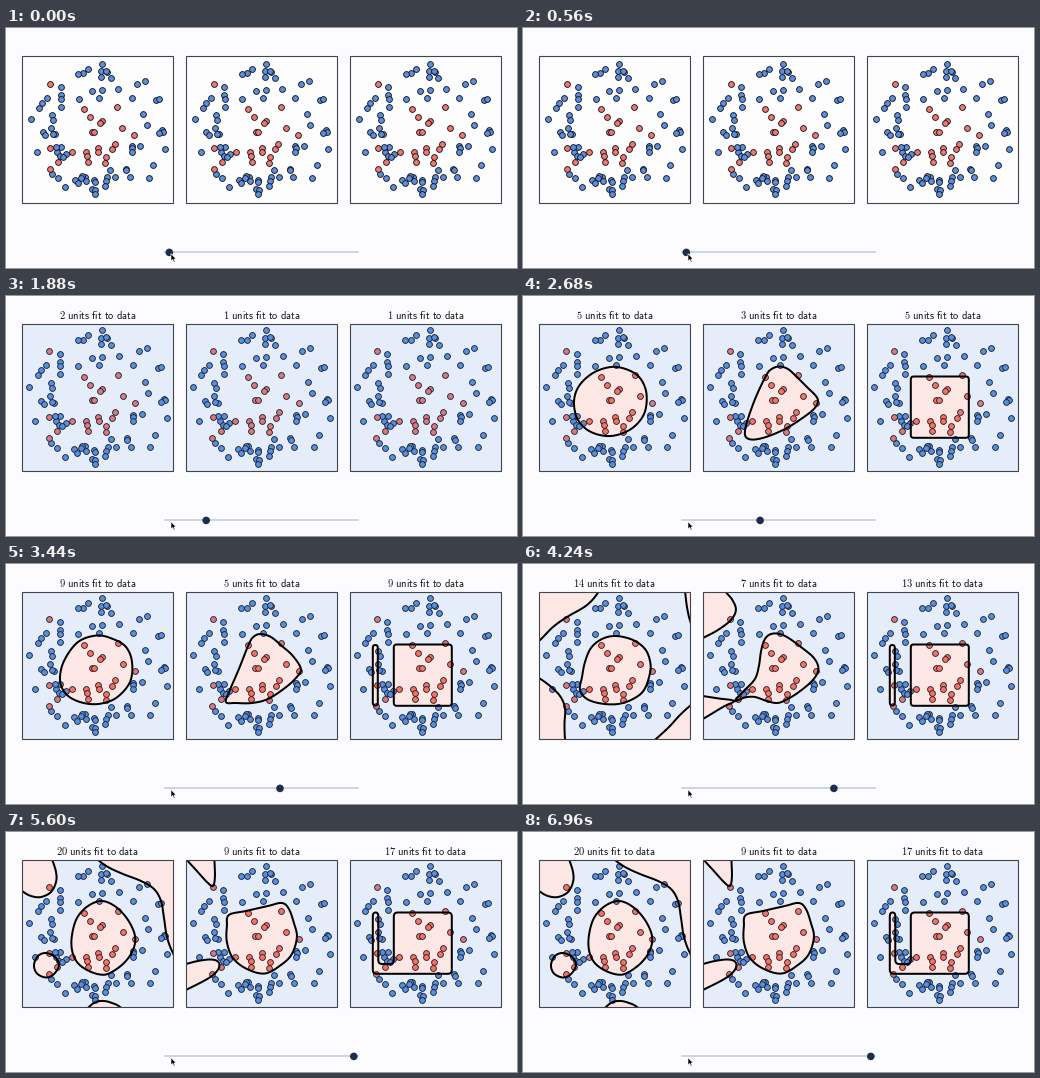
A matplotlib script that plays this animation: 511x240 px, repeating every 7 s.

```python
import numpy as np
import matplotlib.pyplot as plt
from matplotlib.animation import FuncAnimation
from matplotlib.patches import Circle, PathPatch, Polygon, Rectangle
from matplotlib.path import Path

W, H, DPI = 511, 240, 100
FRAMES, STEP_MS = 175, 40
SWITCH_MS = [840, 1940, 3040, 4140, 5240]
PX = 72 / DPI

BG, EDGE, NAVY, TRACK = "#fcfcfe", "#40444c", "#1f2d4d", "#cdd5e1"
BLUE, RED = "#5c8fe0", "#f4766e"
BLUE_TINT, RED_TINT, TINT = "#4a88e6", "#ff5a48", 0.13

# Panel geometry; shapes and dots use the first panel's coordinates.
X0, Y0, X1, Y1, PITCH = 16, 27.6, 167.3, 174.8, 163.9
CENTER = np.array([(X0 + X1) / 2, (Y0 + Y1) / 2])

BLUE_TOP = [
    (96, 34), (82, 39), (77, 43.5), (71.5, 44), (95, 41.5), (101, 42), (100, 41),
    (95, 47.5), (105, 49), (132.5, 55), (140.5, 52), (53.5, 58), (53.5, 66),
    (54, 70), (39.5, 69), (34.5, 74), (31.5, 79), (96, 61), (86, 62), (113, 59.5),
    (126.5, 69), (151.5, 71.5), (154.5, 70.5), (72, 70), (93, 69), (54, 78),
    (23, 91), (44.5, 86.5), (46, 92), (138.5, 86), (142, 96.5), (44, 100),
]
BLUE_LOW = [
    (35, 104.5), (37.5, 107.5), (48, 106.5), (45.5, 106), (29, 124.5),
    (157.5, 102.5), (158.5, 104), (155, 105.5), (160.5, 122), (126.5, 118.5),
    (127, 121), (126.5, 125), (135.5, 118), (149, 138.5), (144, 151),
    (120.5, 142), (121, 143.5), (124.5, 150.5), (104.5, 143), (101.5, 150.5),
    (109.5, 150.5), (100, 155), (99, 159.5), (88, 153.5), (88.5, 155.5),
    (86, 163), (89, 164), (88.5, 168), (78.5, 150), (76, 149.5), (68, 153),
    (75, 151.5), (80, 154.5), (71, 156.5), (58.5, 160.5), (51, 151.5),
    (45, 147), (59.5, 126.5), (54, 119.5), (50, 124.5), (53, 129),
    (56, 129.5), (48.5, 120),
]
REDS = [
    (43, 55), (111.5, 78.5), (78, 80.5), (84, 89), (96, 93), (94, 94.5),
    (116.5, 99.5), (129, 107), (85.5, 104), (88, 104), (109, 116),
    (106, 121.5), (92, 121), (92.5, 125), (79.5, 124.5), (65.5, 125),
    (81, 129), (100, 130), (99.5, 136), (81.5, 134.5), (43, 120.5),
    (51, 134.5), (42.5, 142),
]


def wind(pts):
    """Points in a fixed turning direction."""
    x, y = np.asarray(pts, float).T
    area = np.sum(x * np.roll(y, -1) - y * np.roll(x, -1))
    return np.column_stack([x, y])[:: 1 if area > 0 else -1]


def closed_path(pts):
    return Path(np.vstack([pts, pts[:1]]), closed=True)


def blob(*pts):
    """Closed Catmull-Rom curve."""
    p = wind(pts)
    a, c, d = np.roll(p, 1, 0), np.roll(p, -1, 0), np.roll(p, -2, 0)
    t = np.linspace(0, 1, 12, endpoint=False)[None, :, None]
    a, b, c, d = (q[:, None, :] for q in (a, p, c, d))
    s = 0.5 * (2 * b + (c - a) * t + (2 * a - 5 * b + 4 * c - d) * t**2
               + (3 * b - a - 3 * c + d) * t**3)
    return closed_path(s.reshape(-1, 2))


def rounded(r, *pts):
    """Polygon with rounded corners."""
    p = wind(pts)
    t = np.linspace(0, 1, 8)[:, None]
    out = []
    for a, b, c in zip(np.roll(p, 1, 0), p, np.roll(p, -1, 0)):
        u = b + (a - b) * min(r / np.hypot(*(a - b)), 0.5)
        v = b + (c - b) * min(r / np.hypot(*(c - b)), 0.5)
        out.append((1 - t) ** 2 * u + 2 * t * (1 - t) * b + t**2 * v)
    return closed_path(np.vstack(out))


def box(x0, y0, x1, y1, r=3):
    return rounded(r, (x0, y0), (x1, y0), (x1, y1), (x0, y1))


SQUARE = box(60, 80.5, 118, 141.8)
STRIP = box(39, 81, 44, 141.5, 3)

STAGES = [
    ((2, 1, 1), ([], [], [])),
    ((5, 3, 5), (
        [blob((88, 71), (104, 73.5), (117, 82), (123.5, 98), (121, 118),
              (108, 133), (88, 140), (68, 136), (55, 124), (51, 106),
              (56, 90), (70, 77))],
        [blob((79, 80), (84, 73.5), (92, 70.5), (101, 73), (110, 81),
              (120, 91), (129, 100), (131, 106), (127, 113), (117, 121),
              (100, 132), (82, 140), (68, 143.5), (60, 142), (58, 136),
              (61, 123), (69, 101))],
        [SQUARE])),
    ((9, 5, 9), (
        [blob((91, 71.5), (107, 75), (120, 83), (126, 98), (124, 118),
              (110, 134), (92, 140), (74, 138), (60, 130), (54, 116),
              (58, 97), (72, 78))],
        [blob((79, 80), (84, 72.5), (91, 70), (101, 73), (112, 82),
              (123, 92), (131, 105), (126, 114), (115, 124), (98, 135),
              (82, 139), (66, 139), (56, 138), (60, 126), (69, 105))],
        [SQUARE, STRIP])),
    ((14, 7, 13), (
        [blob((93, 72), (110, 76), (122, 85), (127, 97), (127, 109),
              (121, 126), (110, 135), (95, 140), (78, 139.5), (64, 135),
              (57, 126), (59, 113), (62, 98), (68, 84), (79, 75)),
         blob((82, 12), (76, 27), (64, 41), (44, 53), (30, 63), (16, 77),
              (0, 90), (-10, 0)),
         blob((0, 104), (16, 114), (27, 122), (37, 132), (42, 144),
              (41.5, 160), (42, 175), (44, 190), (-10, 195)),
         blob((160, 12), (162, 27), (164, 43), (167.5, 58), (175, 75),
              (185, 10)),
         blob((120, 187), (133, 175), (146, 163), (157, 151), (168, 141),
              (182, 130), (190, 195))],
        [blob((77, 77), (82, 71), (90, 69.5), (100, 73), (114, 83),
              (127, 94), (131.5, 105), (126, 116), (112, 128), (99, 136),
              (90, 139), (80, 137), (68, 133), (58, 133.5), (48, 137),
              (57, 127), (68, 115), (72, 102), (74, 88)),
         blob((0, 129), (16, 132), (32, 134.5), (47, 137), (36, 143),
              (16, 155), (0, 164)),
         blob((27, 12), (38, 27), (45.5, 36), (49, 46), (44, 56),
              (31, 66), (16, 74), (0, 82), (-10, 5))],
        [SQUARE, STRIP])),
    ((20, 9, 17), (
        [blob((96, 69), (110, 75), (122, 88), (129, 104), (127, 118),
              (118, 131), (104, 141), (94, 142.5), (81, 138), (71, 130),
              (66, 118), (66, 103), (71, 86), (82, 74)),
         blob((40, 121), (49, 125), (53, 133), (48, 142), (40, 145.5),
              (31, 141.5), (28, 133), (32, 124)),
         blob((0, 47), (16, 59), (25, 64), (35, 65), (45, 60), (50, 50),
              (50, 40), (46, 27), (40, 10), (-5, 5)),
         blob((80, 15), (91, 27), (102, 35), (117, 42), (135, 49),
              (148, 57), (155, 69), (158, 86), (161, 105), (167, 121),
              (178, 138), (190, 10)),
         blob((72, 188), (83, 175), (90, 170), (98, 169), (106, 171),
              (114, 175), (128, 188))],
        [blob((59, 83), (76, 79), (98, 74), (112, 71), (119, 77),
              (124, 91), (127, 105), (122, 122), (111, 133), (95, 141.5),
              (77, 137), (63, 126), (57, 110), (57, 94)),
         blob((5, 14), (17, 28), (27, 39), (37, 50), (43, 54), (45, 45),
              (44.5, 27), (44, 10)),
         blob((0, 136), (16, 132), (28, 129), (41, 127.5), (48.5, 130),
              (48.5, 137), (39, 146), (16, 158), (0, 166))],
        [rounded(4, (39, 80.5), (39, 141.8), (118, 141.8), (118, 80.5),
                 (60, 80.5), (60, 132), (44.5, 132), (44.5, 80.5))])),
]

plt.rcParams["mathtext.fontset"] = "cm"
fig = plt.figure(figsize=(W / DPI, H / DPI), dpi=DPI, facecolor=BG)
ax = fig.add_axes([0, 0, 1, 1])
ax.set(xlim=(0, W), ylim=(H, 0))
ax.axis("off")


def frame(k, **style):
    return ax.add_patch(Rectangle((X0 + k * PITCH, Y0), X1 - X0, Y1 - Y0, **style))


def dots(k, scale):
    out = []
    for pts, color in ((BLUE_TOP + BLUE_LOW, BLUE), (REDS, RED)):
        x, y = (CENTER + (np.array(pts) - CENTER) * scale).T
        out += ax.plot(x + k * PITCH, y, "o", ms=5.8 * PX, mfc=color,
                       mec="#14181f", mew=0.9 * PX, zorder=2)
    return out


def regions(k, shapes):
    """Tinted classes and their boundary inside one panel."""
    shift = np.array([k * PITCH, 0])
    moved = [Path(s.vertices + shift, s.codes) for s in shapes]
    frame_pts = np.array([(-40, -40), (-40, 240), (240, 240), (240, -40)]) + shift
    outside = Path.make_compound_path(closed_path(frame_pts), *moved)
    out = [PathPatch(outside, fc=BLUE_TINT, alpha=TINT, lw=0, zorder=3)]
    out += [PathPatch(s, fc=RED_TINT, alpha=TINT, lw=0, zorder=3) for s in moved]
    out += [PathPatch(s, fc="none", ec="black", lw=2 * PX, zorder=4,
                      joinstyle="round") for s in moved]
    for p in out:
        ax.add_patch(p)
        p.set_clip_path(clips[k])
    return out


def title(k, n):
    text = rf"$\mathsf{{{n}\ units\ fit\ to\ data}}$"
    return ax.text(CENTER[0] + k * PITCH, 22.6, text, size=10.5 * PX,
                   ha="center", va="baseline", color="#111111", zorder=6)


clips = [frame(k, fc="#fdfdfd", ec="none", zorder=1) for k in range(3)]
for k in range(3):
    frame(k, fc="none", ec=EDGE, lw=1.1 * PX, zorder=5)

plain = [d for k in range(3) for d in dots(k, 0.972)]
fitted = [d for k in range(3) for d in dots(k, 1)]
stages = [[]]
for units, shapes in STAGES:
    group = []
    for k in range(3):
        group += regions(k, shapes[k]) + [title(k, units[k])]
    stages.append(group)

ax.plot([159, 352], [224.4, 224.4], color=TRACK, lw=2 * PX,
        solid_capstyle="round", zorder=6)
knob = ax.add_patch(Circle((163.3, 224.4), 3.8, fc=NAVY, ec="none", zorder=7))
arrow = np.array([(0, 0), (0, 7.4), (1.7, 5.9), (2.9, 8.6), (4.1, 8.1),
                  (2.9, 5.5), (5.1, 5.3)])
ax.add_patch(Polygon(arrow + (165, 225.6), fc="black", ec="white",
                     lw=0.6 * PX, zorder=8))


def update(i):
    now = int(np.searchsorted(SWITCH_MS, i * STEP_MS, side="right"))
    for s, group in enumerate(stages):
        for artist in group:
            artist.set_visible(s == now)
    for artist in plain:
        artist.set_visible(now == 0)
    for artist in fitted:
        artist.set_visible(now > 0)
    knob.center = (163.3 + 36.9 * now, 224.4)
    return []


anim = FuncAnimation(fig, update, frames=FRAMES, interval=STEP_MS,
                     init_func=lambda: update(0), repeat=True, repeat_delay=0)
plt.show()
```
